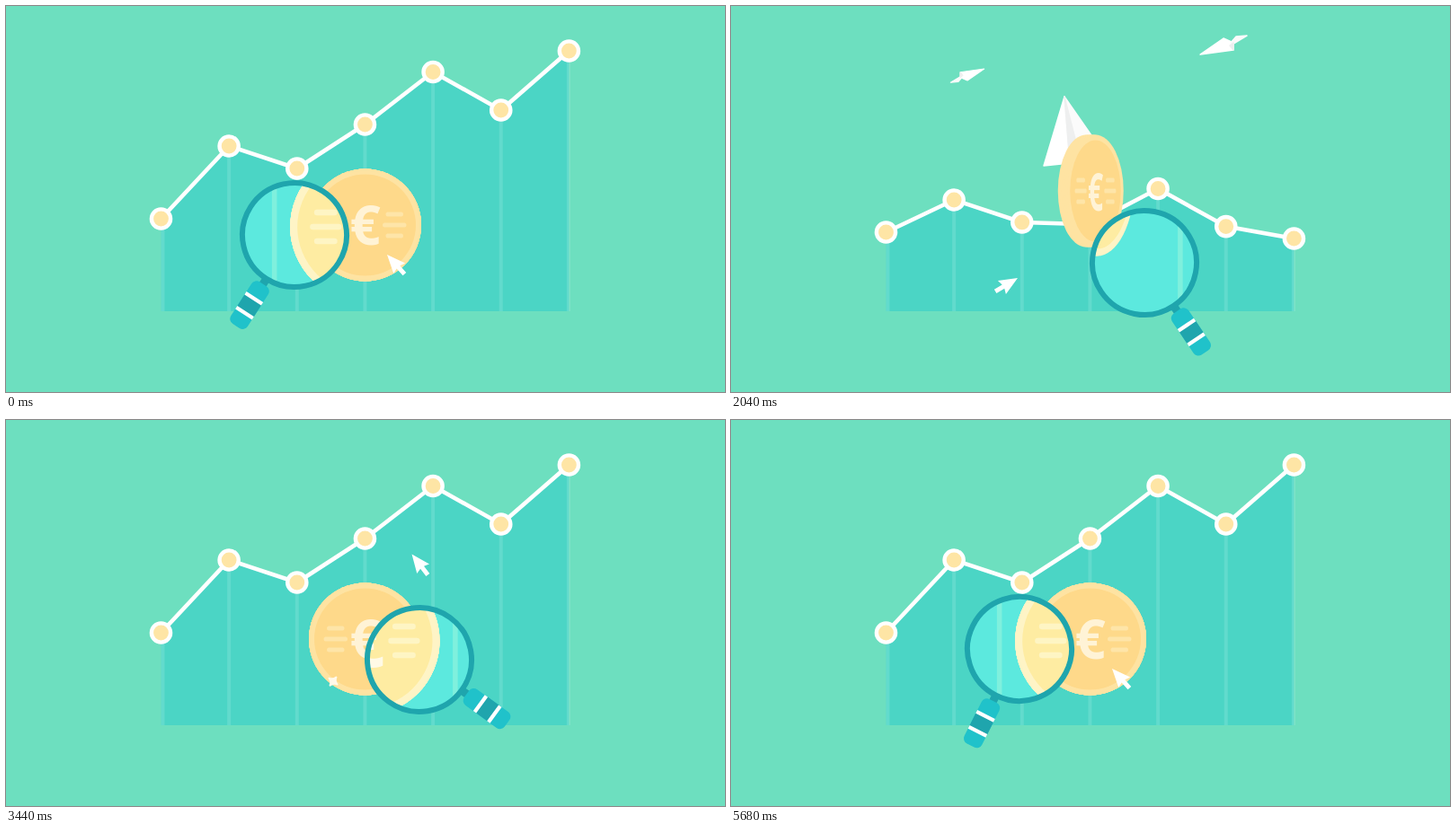
Animation of 800x430 px, one loop 5.72 s. Source, as an HTML page:

```html
<!DOCTYPE html>
<html lang="en">
<head>
<meta charset="utf-8">
<title>Coin and chart</title>
<style>
  html, body { margin: 0; width: 100%; height: 100%; overflow: hidden; background: #6ddfbf; }
  svg { display: block; width: 100vw; height: 100vh; }
  text { font: 700 60px "Open Sans", "Noto Sans", sans-serif; text-anchor: middle; }
</style>
</head>
<body>
<svg id="stage" viewBox="0 0 800 430">
  <defs><clipPath id="lensClip"><circle id="lensHole" r="57"/></clipPath></defs>
  <rect width="800" height="430" fill="#6ddfbf"/>
  <path id="area" fill="#4bd5c5"/>
  <path id="columns" stroke="#fff" stroke-opacity=".13" stroke-width="4"/>
  <path id="line" fill="none" stroke="#fff" stroke-width="4.6" stroke-linejoin="round"/>
  <g id="dots" fill="#fee5a5" stroke="#fff" stroke-width="4.4"></g>
  <g id="planes" stroke-linejoin="round" stroke-width="1.5"></g>
  <g id="coin"></g>
  <g id="sparkles" fill="#fff9ea" stroke="#fff9ea" stroke-width="2" stroke-linejoin="round"></g>
  <path id="cursor" fill="#fff" d="M0 0L8.7 20.5L2.5 18.7V29H-2.5V18.7L-8.7 20.5Z"/>
  <g clip-path="url(#lensClip)">
    <rect width="800" height="430" fill="#5ce9de"/>
    <g transform="translate(400 246) scale(1.33) translate(-400 -244)">
      <path id="lensColumns" stroke="#7ff0dd" stroke-width="4.2"/>
      <g id="lensCoin"></g>
      <g id="lensPlane" stroke-linejoin="round" stroke-width="1.5"></g>
    </g>
  </g>
  <g id="magnifier">
    <path d="M58 0H70" stroke="#1fa5ad" stroke-width="9"/>
    <rect x="65" y="-11" width="55.5" height="22" rx="6.5" fill="#20c2ca"/>
    <rect x="85" y="-11" width="17" height="22" fill="#1fa5ad"/>
    <path d="M84 -11V11M103 -11V11" stroke="#fff" stroke-width="4.2"/>
    <circle r="58" fill="none" stroke="#1fa5ad" stroke-width="6"/>
  </g>
</svg>
<script>
const LOOP = 5720, BASE = 340;
const HOME = { x: 399.5, y: 244 };

const $ = id => document.getElementById(id);
const lerp = (a, b, k) => a + (b - a) * k;
const mix = (a, b, k) => a.map((v, i) => lerp(v, b[i], k));
const poly = points => "M" + points.map(p => p.join(" ")).join("L");
const place = (x, y, angle, size = 1) => `translate(${x} ${y}) rotate(${angle}) scale(${size})`;

// Progress of t between two moments, and the curves built on it.
const ramp = (t, from, to) => Math.max(0, Math.min(1, (t - from) / (to - from)));
const ease = (t, from, to) => { const u = ramp(t, from, to); return u * u * (3 - 2 * u); };
const easeOut = (t, from, to) => 1 - (1 - ramp(t, from, to)) ** 2;
const bump = (t, from, to) => Math.sin(Math.PI * ramp(t, from, to)) ** 2;
const cubicInOut = u => u < .5 ? 4 * u ** 3 : 1 - 4 * (1 - u) ** 3;
const backOut = u => 1 + 2 * (u - 1) ** 3 + (u - 1) ** 2;

function set(el, attrs) {
  for (const key in attrs) el.setAttribute(key, attrs[key]);
}
function add(parent, tag, attrs = {}) {
  const el = document.createElementNS("http://www.w3.org/2000/svg", tag);
  set(el, attrs);
  parent.appendChild(el);
  return el;
}

// Chart: the points sink and spring back one after another.
const high = [237, 156, 181, 132, 73.5, 116, 50];
const low = [252, 216, 241, 243.5, 204, 246.5, 261.4];
const xs = high.map((_, i) => 172.5 + i * 75.65);
const columnXs = xs.map((x, i) => i === 0 ? x + 2 : i === 6 ? x - .5 : x);
const dots = xs.map(x => add($("dots"), "circle", { cx: x, r: 10.6 }));
set($("lensColumns"), { d: columnXs.map(x => `M${x} 0V${BASE}`).join("") });

function drawChart(t) {
  const ys = high.map((top, i) => {
    const fall = cubicInOut(ramp(t - 45 * i, -75, 2075));
    const rise = backOut(ramp(t - 44 * i, 2465, 3005));
    return lerp(top, low[i], fall * (1 - rise));
  });
  const points = xs.map((x, i) => [x, ys[i]]);
  set($("line"), { d: poly(points) });
  set($("area"), { d: poly([[xs[0], BASE], ...points, [xs[6], BASE]]) + "Z" });
  set($("columns"), { d: columnXs.map((x, i) => `M${x} ${ys[i]}V${BASE}`).join("") });
  dots.forEach((dot, i) => set(dot, { cy: ys[i] }));
}

// Coin: stacked rims give the edge its thickness.
const EDGE = 6;
function makeCoin(parent, rim, face, mark, glyph) {
  const rims = Array.from({ length: EDGE }, () => add(parent, "circle", { r: 62.5, fill: rim }));
  const front = add(parent, "g");
  add(front, "circle", { r: 56.5, fill: face });
  add(front, "path", {
    d: [-1, 1].map(s => `M${25.5 * s} -12H${40 * s}M${22 * s} 0H${43.5 * s}M${25.5 * s} 12H${40 * s}`).join(""),
    stroke: mark, "stroke-width": 5, "stroke-linecap": "round"
  });
  add(front, "text", { y: 21.7, fill: glyph }).textContent = "€";
  return { rims, front };
}
const coins = [
  makeCoin($("coin"), "#fee3a2", "#fed98a", "#fee5a8", "#fff3d6"),
  makeCoin($("lensCoin"), "#fef4c6", "#feeca2", "#fef5c4", "#fffae6")
];
function drawCoin(t) {
  const turn = ease(t, 400, 2040) * (1 - ease(t, 2040, 2700));
  const tilt = bump(t, 400, 1440);
  const x = HOME.x + 6 * turn + tilt, y = HOME.y - 38 * turn + 15 * tilt;
  const skew = -.1 * tilt, edge = -10.5 * Math.sqrt(turn);
  const matrix = k =>
    `matrix(${1 - .5 * turn} ${skew} ${skew} ${1 - .03 * tilt} ${x + edge * k} ${y + 2 * tilt * k})`;
  for (const { rims, front } of coins) {
    rims.forEach((rim, i) => set(rim, { transform: matrix(1 - i / (EDGE - 1)) }));
    set(front, { transform: matrix(0) });
  }
}

// Paper planes: left part, right part and fold of each view.
const topView = [
  [[-2, -39], [-25, 38], [4, 35], [4, 14]],
  [[-2, -39], [4, 35], [12, 22], [30, 7]],
  [[-2, -39], [4, 35], [13, 20]]
];
const sideView = [
  [[-26, 11], [0, -7], [11, -2], [11, 6]],
  [[8, -2], [14, -9], [26, -10], [11, -1]],
  [[7, 1], [11, -2], [11, 6]]
];
const openView = [
  [[14, 15], [-24, 5], [-9, -6], [5, 6]],
  [[14, 15], [2, -11], [6, -14], [21, -16]],
  [[14, 15], [2, 4], [5, -2]]
];
const narrowView = [
  [[6, 14], [-13, -7], [-9, -10], [1, -12]],
  [[6, 14], [1, -10], [3, -12], [13, -13]],
  [[6, 14], [0, 2], [2, -8]]
];
// Each plane leaves the coin, passes two poses (x, y, angle, size) and returns.
const nest = [HOME.x, 225, 0, .1];
const flights = [
  { views: [topView, topView], poses: [[373, 140, 0, 1], [453, 220, 10, .3]] },
  { views: [sideView, narrowView], poses: [[263, 78, 180, .72], [341, 124, 0, 1]] },
  { views: [sideView, openView], poses: [[548, 43, 0, 1], [392, 26, 0, 1]] }
];
const makePlane = parent => {
  const group = add(parent, "g");
  const parts = ["#fff", "#fbfbfb", "#eeefef"].map(c => add(group, "path", { fill: c, stroke: c }));
  return { group, parts };
};
const planes = flights.map(() => makePlane($("planes")));
const lensPlane = makePlane($("lensPlane"));

function drawPlane({ group, parts }, { views: [from, to], poses }, t) {
  const drift = ease(t, 2040, 2920);
  const out = mix(nest, mix(poses[0], poses[1], drift), ease(t, 1200, 1900));
  set(group, {
    visibility: t > 1200 && t < 3400 ? "visible" : "hidden",
    transform: place(...mix(out, nest, ease(t, 2920, 3400)))
  });
  parts.forEach((part, i) => set(part, {
    d: poly(from[i].map((p, j) => mix(p, to[i][j], drift))) + "Z"
  }));
}

// Sparkles twinkle around the rim of the coin.
const sparkles = [
  { at: 127, size: 7, start: 2750 },
  { at: 204, size: 14.5, start: 3600 },
  { at: 301, size: 14, start: 3930 },
  { at: 361, size: 12, start: 4350 }
].map(s => ({ ...s, el: add($("sparkles"), "path", {
  "vector-effect": "non-scaling-stroke",
  d: "M0 -1Q.2 -.2 1 0Q.2 .2 0 1Q-.2 .2 -1 0Q-.2 -.2 0 -1Z"
}) }));
function drawSparkles(t) {
  for (const { at, size, start, el } of sparkles) {
    const glow = Math.sqrt(Math.sin(Math.PI * ramp(t, start, start + 900)));
    const a = at * Math.PI / 180;
    set(el, {
      visibility: glow > .01 ? "visible" : "hidden",
      transform: place(HOME.x + 59 * Math.cos(a), HOME.y + 59 * Math.sin(a), at - 270, size * (glow || 0))
    });
  }
}

// Cursor: out to the left, back, an arc to the right, then home.
function drawCursor(t) {
  const left = ease(t, 750, 2040), back = ease(t, 2040, 2920);
  const right = ease(t, 2920, 4040), home = ease(t, 4340, 5310);
  const x = 424 - 105 * left + 60 * back + 162 * right - 117 * home;
  const y = 277 + 26 * left - 17 * back - 62 * right - 110 * bump(t, 2920, 4040) + 53 * ease(t, 4200, 4900);
  const angle = -42 + 101 * left - 46.5 * back - 112.5 * right + 58 * home;
  set($("cursor"), { transform: place(x, y, angle) });
}

// Magnifier: sweeps across the coin and back while its handle swings.
function drawMagnifier(t) {
  const settle = ease(t, 2040, 2920);
  const x = 321 + 139 * (ease(t, 780, 2040) - ease(t, 3600, 5300));
  const y = 255 + 31 * ease(t, 0, 1100) + 15 * bump(t, 920, 2040) - 19 * settle
    + 7 * bump(t, 4040, 5400) - 12 * ease(t, 4720, 5400);
  const angle = 122.5 + 33.2 * easeOut(t, 0, 700) - 99.7 * ease(t, 820, 2040) - 9.7 * settle
    - 23 * ease(t, 2920, 4040) + 99.2 * ramp(t, 4700, LOOP) ** 1.5;
  set($("magnifier"), { transform: place(x, y, angle) });
  set($("lensHole"), { cx: x, cy: y });
}

function draw(t) {
  drawChart(t);
  drawCoin(t);
  flights.forEach((flight, i) => drawPlane(planes[i], flight, t));
  drawPlane(lensPlane, flights[0], t);
  drawSparkles(t);
  drawCursor(t);
  drawMagnifier(t);
}

const began = performance.now();
function tick() {
  draw((performance.now() - began) % LOOP);
  requestAnimationFrame(tick);
}
tick();
</script>
</body>
</html>
```
